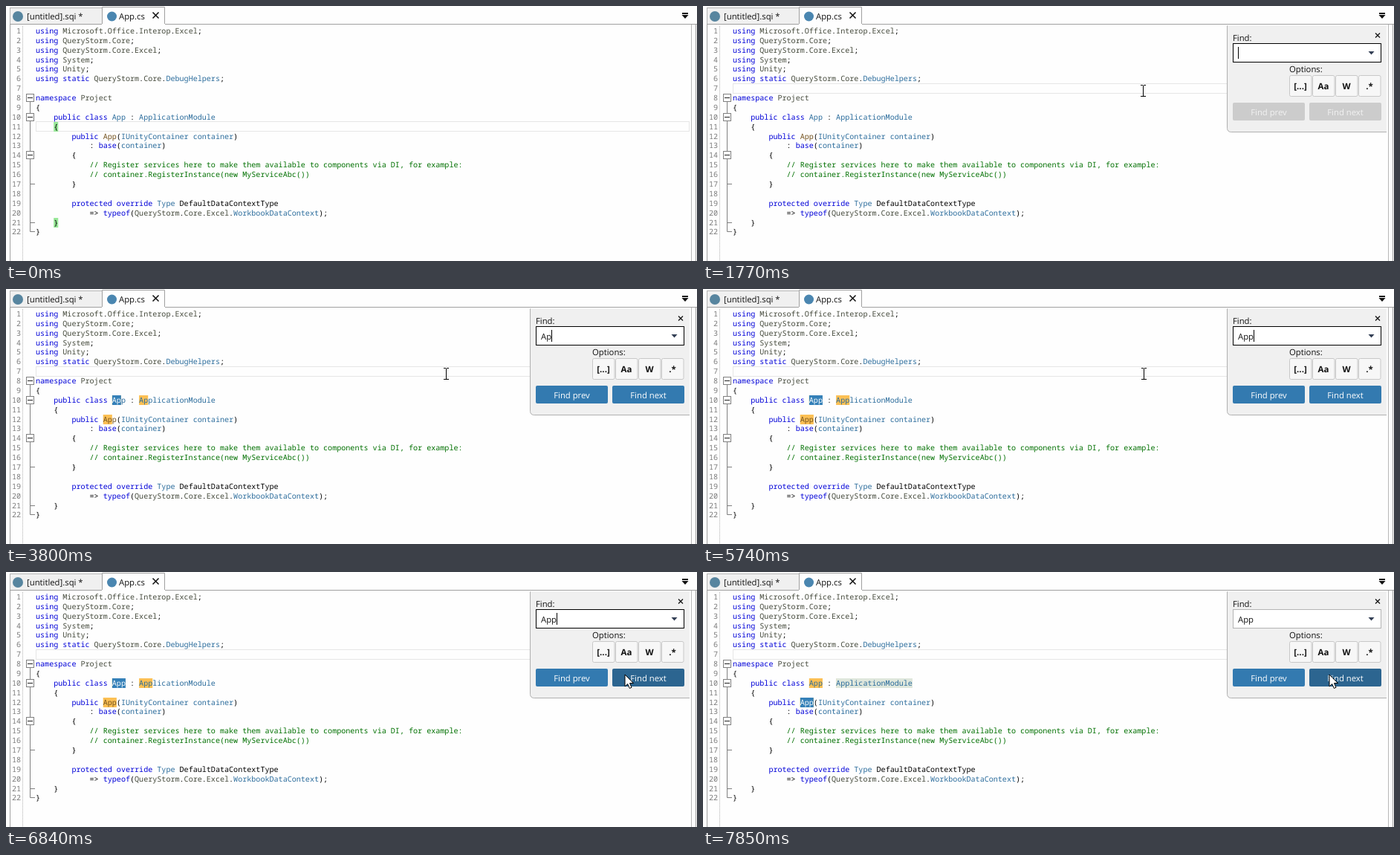
Write an HTML page with a canvas that moves like this. It is 930 px wide and 343 px high and loops after 8 s.

```html
<!DOCTYPE html>
<html lang="en">
<head>
<meta charset="utf-8">
<title>Find in code</title>
<style>
html, body { margin: 0; width: 100%; height: 100%; overflow: hidden; background: #fff; }
canvas { display: block; }
</style>
</head>
<body>
<canvas id="stage" width="930" height="343"></canvas>
<script>
const ctx = document.getElementById('stage').getContext('2d');
const LOOP = 8000, LEFT = 40, CHAR = 6.048, TOP = 27, PITCH = 12.88;
const MONO = '10.08px "Noto Sans Mono", monospace';
const UI = '11.3px "Open Sans", sans-serif';
const BOLD = 'bold 11.5px "Open Sans", sans-serif';
const BLUE = '#337ab0', DARK = '#2c6590', EDGE = '#a0a0a0';

const code = `using Microsoft.Office.Interop.Excel;
using QueryStorm.Core;
using QueryStorm.Core.Excel;
using System;
using Unity;
using static QueryStorm.Core.DebugHelpers;

namespace Project
{
    public class App : ApplicationModule
    {
        public App(IUnityContainer container)
            : base(container)
        {
            // Register services here to make them available to components via DI, for example:
            // container.RegisterInstance(new MyServiceAbc())
        }

        protected override Type DefaultDataContextType
            => typeof(QueryStorm.Core.Excel.WorkbookDataContext);
    }
}`.split('\n');

const keywords = /^(using|static|namespace|public|class|base|protected|override|typeof)$/;
const types = /^(DebugHelpers|App|ApplicationModule|IUnityContainer|container|Type|WorkbookDataContext)$/;
const spaces = /^(Microsoft|Office|Interop|Excel|QueryStorm|Core|System|Unity|Project)$/;

function tokenColor(word, row) {
  if (row === 11 && word === 'App') return '#74531f';
  if (keywords.test(word)) return '#0000d8';
  if (types.test(word)) return '#2b6c9c';
  if (spaces.test(word)) return '#454a3c';
  return '#000';
}

const tokens = code.map((line, row) => {
  const comment = line.includes('//');
  return [...line.matchAll(comment ? /\S+/g : /\w+|[^\w\s]/g)].map(m => ({
    word: m[0], col: m.index, color: comment ? '#007000' : tokenColor(m[0], row)
  }));
});

const colX = col => LEFT + col * CHAR;
const rowY = row => TOP + row * PITCH;
const rowTop = row => Math.round(rowY(row));
const baseline = row => Math.round(rowY(row) + 9.9);

function rect(x, y, w, h, color) {
  ctx.fillStyle = color;
  ctx.fillRect(x, y, w, h);
}

function frame(x, y, w, h, color) {
  ctx.strokeStyle = color;
  ctx.lineWidth = 1;
  ctx.strokeRect(x + .5, y + .5, w - 1, h - 1);
}

function round(x, y, w, h, r, fill, stroke) {
  ctx.beginPath();
  ctx.roundRect(x, y, w, h, r);
  ctx.fillStyle = fill;
  ctx.fill();
  if (stroke) {
    ctx.strokeStyle = stroke;
    ctx.lineWidth = 1;
    ctx.stroke();
  }
}

function poly(points, fill, stroke, width = 1) {
  ctx.beginPath();
  points.forEach(([x, y]) => ctx.lineTo(x, y));
  if (fill) {
    ctx.closePath();
    ctx.fillStyle = fill;
    ctx.fill();
  }
  if (stroke) {
    ctx.strokeStyle = stroke;
    ctx.lineWidth = width;
    ctx.stroke();
  }
}

function dot(x, y, r, color) {
  ctx.beginPath();
  ctx.arc(x, y, r, 0, 7);
  ctx.fillStyle = color;
  ctx.fill();
}

function text(s, x, y, font, color, align = 'left') {
  ctx.font = font;
  ctx.textAlign = align;
  ctx.fillStyle = color;
  ctx.fillText(s, x, y);
}

function cross(x, y, r, width) {
  poly([[x - r, y - r], [x + r, y + r]], null, '#111', width);
  poly([[x + r, y - r], [x - r, y + r]], null, '#111', width);
}

function codeLine(row, color) {
  for (const k of tokens[row])
    text(k.word, colX(k.col), baseline(row), MONO, color || k.color);
}

function mark(row, col, length, color) {
  rect(colX(col), rowTop(row), length * CHAR, 13, color);
}

function drawChrome() {
  rect(0, 0, 930, 343, '#fefefe');
  rect(6, 3, 123, 21, '#f0f0f0');
  frame(5, 2, 125, 23, '#b4b4b4');
  rect(5, 24, 925, 1, EDGE);
  rect(5, 24, 1, 319, EDGE);
  rect(928, 24, 1, 319, EDGE);
  rect(922, 25, 1, 318, '#b8b8b8');
  rect(129, 1, 85, 25, '#fefefe');
  poly([[129.5, 24], [129.5, 1.5], [213.5, 1.5], [213.5, 24]], null, EDGE);
  dot(16, 14, 7, '#57859f');
  dot(142.5, 14, 6.5, '#4a86b0');
  text('[untitled].sqi *', 28, 18, UI, '#111');
  text('App.cs', 152, 18, UI, '#111');
  cross(201.5, 12.5, 4, 1.6);
  rect(910, 9, 8, 2, '#111');
  poly([[909.5, 12], [918.5, 12], [914, 17]], '#111');
}

function drawMargin() {
  code.forEach((_, row) => text(row + 1, 20, baseline(row), MONO, '#7b7b7b', 'right'));
  ctx.setLineDash([1, 1]);
  poly([[22.5, 27], [22.5, 343]], null, '#b0b0b0');
  ctx.setLineDash([]);
  poly([[32.5, 124], [32.5, 303.5], [39, 303.5]], null, '#808080');
  for (const y of [239.5, 291.5]) poly([[32, y], [39, y]], null, '#808080');
  for (const y of [118, 144, 195]) {
    rect(27, y, 11, 11, '#fff');
    frame(27, y, 11, 11, '#808080');
    rect(29, y + 5, 7, 1, '#222');
  }
}

function drawEditor(t, query) {
  const moved = t >= 1310;
  frame(40, Math.floor(rowY(moved ? 6 : 10)), 880, 14, '#e6e6e6');
  if (!moved) for (const row of [10, 20]) mark(row, 4, 1, '#98e898');

  const hits = [];
  if (query) code.forEach((line, row) => {
    for (const m of line.matchAll(new RegExp(query, 'gi'))) hits.push([row, m.index]);
  });
  for (const [row, col] of hits) mark(row, col, query.length, '#fcc054');
  if (t >= 7320) mark(9, 23, 17, '#dfe7dc');
  else if (t >= 4030) mark(9, 17, 3, '#dfe7dc');

  code.forEach((_, row) => codeLine(row));
  drawMargin();
  if (moved && t < 1770) rect(40, rowTop(6), 1, 13, '#000');

  const step = t >= 7850 ? 2 : t >= 7150 ? 1 : 0;
  const selected = hits.filter(h => h[0] > 6)[step];
  if (selected) {
    const [row, col] = selected;
    ctx.save();
    ctx.beginPath();
    ctx.rect(colX(col), rowTop(row), query.length * CHAR, 13);
    ctx.clip();
    mark(row, col, query.length, '#3480b8');
    codeLine(row, '#fff');
    ctx.restore();
  }
}

function drawPanel(t, query) {
  const focus = t < 7150;
  round(705.5, 26.5, 215, 143, [0, 0, 0, 5], '#f0f0f0', '#b0b0b0');
  rect(706, 26, 215, 1, '#f0f0f0');
  rect(920, 26, 2, 145, '#fefefe');
  text('Find:', 713, 47, UI, '#111');
  cross(908, 39.5, 3, 1.3);
  rect(713, 50, 200, 26, '#fff');
  frame(713, 50, 200, 26, focus ? '#000' : '#b4b4b4');
  text(query, 720, 68, UI, '#111');
  poly([[895.5, 61], [903.5, 61], [899.5, 65.5]], '#333f55');

  // The caret blinks, restarting with every key press
  const since = t - (t < 2790 ? 1770 : t < 3800 ? 2790 : t < 4260 ? 3800 : 4260);
  if (focus && Math.floor(since / 545) % 2 === 0)
    rect([720, 727, 734, 741][query.length], 55, 1, 16, '#000');

  text('Options:', 789, 89, UI, '#111');
  ['[...]', 'Aa', 'W', '.*'].forEach((label, i) => {
    const x = 789 + i * 31;
    round(x + .5, 93.5, 29.5, 28, 2, '#f7f7f7', '#c8c8c8');
    text(label, x + 15, 112, BOLD, '#111', 'center');
  });

  const base = t < 2790 ? '#cccccc' : t < 2870 ? '#80a3be' : BLUE;
  const label = t < 2790 ? '#f2f2f2' : '#fff';
  const prev = t >= 6360 && t < 6760 ? DARK : base;
  const next = t >= 7700 && t < 7850 ? '#285a82' : t >= 6760 ? DARK : base;
  round(713, 130, 97, 24, 2, prev);
  round(816, 130, 97, 24, 2, next);
  text('Find prev', 761.5, 147, UI, label, 'center');
  text('Find next', 864.5, 147, UI, label, 'center');
}

// Pointer stops: time, x, y
const path = [
  [70, 859, 323], [230, 740, 215], [460, 588, 113], [540, 582, 109], [770, 592, 114],
  [5740, 592, 114], [5741, 593, 114], [6050, 594, 114], [6440, 790, 138],
  [6680, 790, 138], [6760, 816, 138], [6840, 833, 138], [7150, 843, 138], [8000, 843, 138]
];

// The pointer is sampled about every 77 ms while it travels
function pointerAt(t) {
  const travel = t < 770 ? 70 : t > 6050 && t < 6440 ? 6060 : 0;
  const at = travel ? travel + Math.floor((t - travel) / 77) * 77 : t;
  const i = Math.max(1, path.findIndex(p => p[0] > at));
  const [a, b] = [path[i - 1], path[i]];
  const f = (at - a[0]) / (b[0] - a[0]);
  return [a[1] + (b[1] - a[1]) * f, a[2] + (b[2] - a[2]) * f].map(Math.round);
}

function drawPointer(t) {
  if (t < 70) return;
  const [x, y] = pointerAt(t);
  if (t > 1770 && x > 706) {
    const shape = [[0, 0], [0, 16], [3.7, 12.6], [6.3, 18.5], [9, 17.3], [6.5, 11.6], [11.5, 11.6], [0, 0]];
    poly(shape.map(([dx, dy]) => [x + dx, y + dy]), '#fff', '#000');
    return;
  }
  rect(x, y - 7, 1, 15, '#000');
  for (const end of [y - 8, y + 7]) {
    rect(x - 3, end, 3, 1, '#000');
    rect(x + 1, end, 3, 1, '#000');
  }
}

function draw(t) {
  const query = 'App'.slice(0, t < 2790 ? 0 : t < 3800 ? 1 : t < 4260 ? 2 : 3);
  drawChrome();
  drawEditor(t, query);
  if (t >= 1770) drawPanel(t, query);
  drawPointer(t);
}

ctx.textRendering = 'geometricPrecision';
const start = performance.now();
function tick() {
  draw((performance.now() - start) % LOOP);
  requestAnimationFrame(tick);
}
tick();
</script>
</body>
</html>
```
